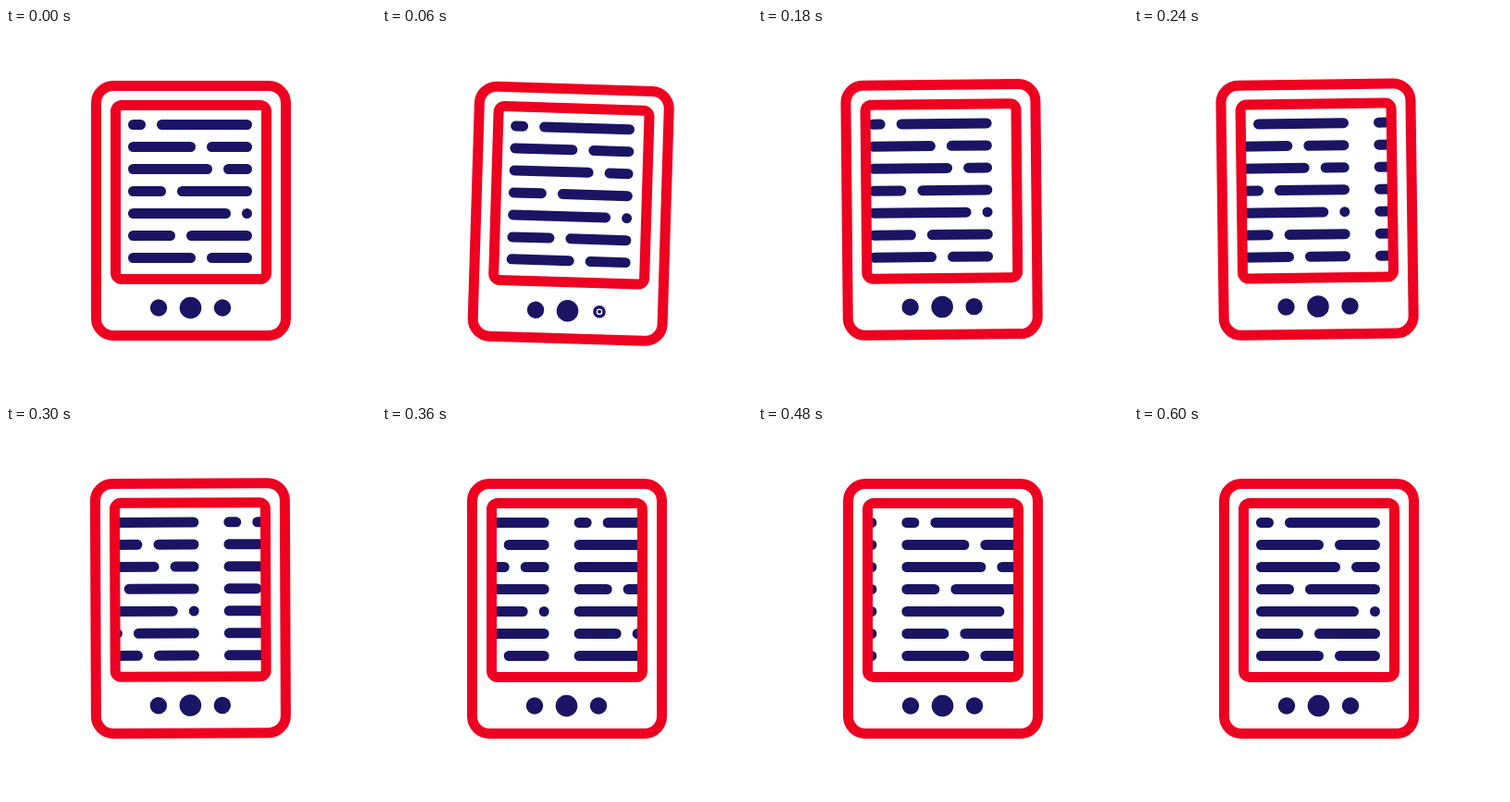
Animation of 400 by 400 pixels, one loop 2.66 s. Source, as an HTML page:

```html
<!DOCTYPE html>
<html lang="en">
<head>
<meta charset="utf-8">
<title>Page turn on an e-reader</title>
<style>
  html, body { margin: 0; width: 100%; height: 100%; overflow: hidden; background: #fff; }
  svg { display: block; width: 100%; height: 100%; }
  .frame { fill: none; stroke: #ed0020; stroke-width: 11; }
  .text { fill: none; stroke: #1b1464; stroke-width: 11; stroke-linecap: round; }
  .button { fill: #1b1464; }
</style>
</head>
<body>
<svg viewBox="0 0 400 400">
  <defs>
    <clipPath id="screen"><rect x="118.5" y="83.5" width="163" height="188"/></clipPath>
    <path id="page" class="text"/>
  </defs>
  <g id="device">
    <g clip-path="url(#screen)">
      <g id="pages">
        <use href="#page"/>
        <use href="#page" x="161"/>
      </g>
    </g>
    <rect class="frame" x="97.5" y="62.5" width="205" height="270" rx="18.5"/>
    <rect class="frame" x="118.5" y="83.5" width="163" height="188" rx="6.5"/>
    <circle class="button" cx="165" cy="302.5" r="9.2"/>
    <circle class="button" cx="199.5" cy="302.5" r="11.8"/>
    <circle id="next" class="button" cx="234" cy="302.5" r="9.2"/>
    <circle id="gap" cx="234" cy="302.5" r="2.7" fill="none" stroke="#fff"/>
  </g>
</svg>
<script>
  const LOOP = 2660, STEP = 30, PAGE_WIDTH = 161;
  const LEFT = 132, RIGHT = 266, CAP = 5.5, WORD_GAP = 12;
  const el = id => document.getElementById(id);

  // Each line is two words; the value is where the first one ends.
  const wordEnds = [151, 205, 223, 173, 243, 183, 205];
  const word = (from, to, y) => `M${from + CAP} ${y}H${to - CAP}`;
  el('page').setAttribute('d', wordEnds.map((end, i) => {
    const y = 104.5 + 24 * i;
    return word(LEFT, end, y) + word(end + WORD_GAP, RIGHT, y);
  }).join(''));

  const scroll = [[100, 0], [600, PAGE_WIDTH]];
  const tilt = [[0, 0], [100, 2.7], [200, -0.95], [350, 0]];
  const press = [[0, 0], [100, 1], [180, 0]];

  // Eased value of a list of [time, value] keys.
  function valueAt(keys, t) {
    if (t <= keys[0][0]) return keys[0][1];
    for (let i = 1; i < keys.length; i++) {
      const [t0, v0] = keys[i - 1], [t1, v1] = keys[i];
      if (t < t1) {
        const x = (t - t0) / (t1 - t0);
        return v0 + (v1 - v0) * x * x * (3 - 2 * x);
      }
    }
    return keys[keys.length - 1][1];
  }

  function draw(time) {
    const t = Math.floor((time % LOOP) / STEP) * STEP;
    const p = valueAt(press, t);
    el('device').setAttribute('transform', `rotate(${valueAt(tilt, t)} 94 338)`);
    el('pages').setAttribute('transform', `translate(${-valueAt(scroll, t)} 0)`);
    el('next').setAttribute('r', 9.2 - 3.7 * p);
    el('gap').setAttribute('stroke-width', Math.max(0, 5 * (p - 0.4)));
  }

  let start;
  function tick(now) {
    start ??= now;
    draw(now - start);
    requestAnimationFrame(tick);
  }
  draw(0);
  requestAnimationFrame(tick);
</script>
</body>
</html>
```
